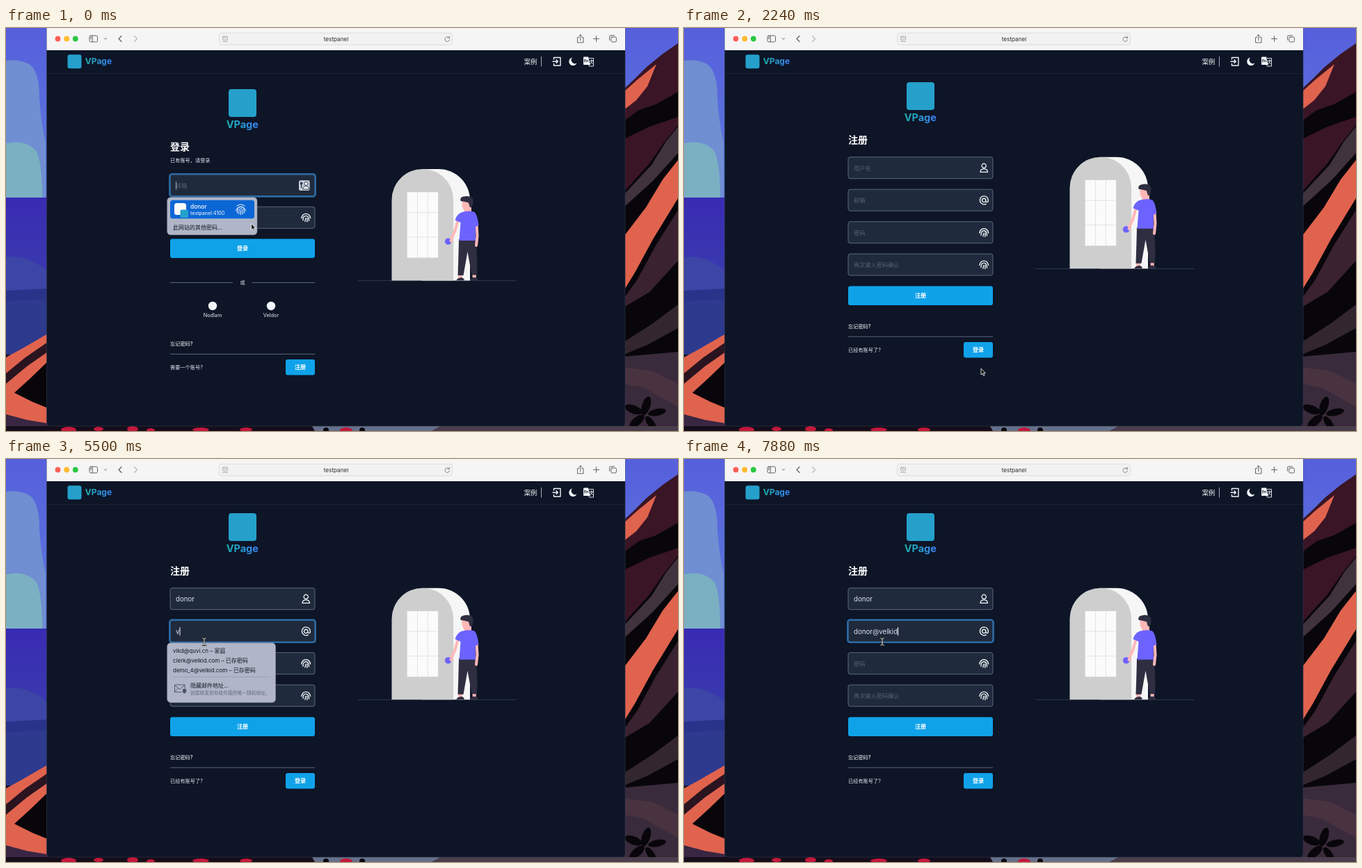
An HTML page for the animation above (8000 ms loop, 966 by 580 pixels).

```html
<!DOCTYPE html>
<html lang="zh-CN">
<head>
<meta charset="utf-8">
<title>Sign in and register</title>
<style>
html, body { margin: 0; width: 100%; height: 100%; overflow: hidden; background: #0d1527; }
svg { display: block; width: 100vw; height: 100vh; font-family: Inter, 'Noto Sans CJK SC', 'Noto Sans CJK', sans-serif; }
text { white-space: pre; }
.line { fill: none; stroke-linecap: round; stroke-linejoin: round; }
.mid { text-anchor: middle; }
.bold { font-weight: 700; }
.med { font-weight: 500; }
.brand { font-weight: 700; fill: url(#brand); }
</style>
</head>
<body>
<svg id="stage" viewBox="0 0 966 580" preserveAspectRatio="none">
  <defs>
    <linearGradient id="brand"><stop stop-color="#1bb0ae"/><stop offset="1" stop-color="#3b82f6"/></linearGradient>
    <linearGradient id="sky" x2="0" y2="1"><stop stop-color="#565fdc"/><stop offset="1" stop-color="#5c7cdc"/></linearGradient>
    <linearGradient id="sea" x2="0" y2="1"><stop stop-color="#392bb2"/><stop offset="1" stop-color="#3a3fae"/></linearGradient>
  </defs>

  <g id="wallpaper">
    <path fill="url(#sky)" d="M0 0H966V250H0Z"/>
    <path fill="#6f8fd2" d="M0 47Q22 44 36 54Q48 66 48 100Q50 135 57 165V244H0Z"/>
    <path fill="#7bb0c3" d="M0 166Q30 160 44 178Q52 195 52 244H0Z"/>
    <path fill="url(#sea)" d="M0 244H60V400H0Z"/>
    <path fill="#3d45a6" d="M0 330Q30 325 60 350V385H0Z"/>
    <path fill="#2a338a" d="M0 378L60 375V400H0Z"/>
    <path fill="#2d3a8d" d="M0 393L60 390V470H0Z"/>
    <path fill="#e0634e" d="M0 474L22 462L60 440V580H0Z"/>
    <path fill="#2a1420" d="M0 497L28 474L60 452V466L30 487L0 512Z"/>
    <path fill="#08060b" d="M60 480L34 505L12 525L38 538L60 547Z"/>
    <path fill="#382642" d="M0 556L30 564L60 569V580H0Z"/>

    <path fill="#391525" d="M966 22L943 38L921 56L905 72L888 88V240H966Z"/>
    <path fill="#e0634e" d="M935 52L908 74L888 92V118L906 104L922 84Z"/>
    <path fill="#08060b" d="M966 92L934 110L910 118L888 134V160L925 142L966 128Z"/>
    <path fill="#08060b" d="M966 140L945 166L925 195L888 236V580H966Z"/>
    <path fill="#40333e" d="M966 142L949 163L928 197L888 240V258L930 220L966 180Z"/>
    <path fill="#e0634e" d="M966 190L944 218L920 258L888 300V378L904 352L930 304L966 245Z"/>
    <path fill="#3a2230" d="M966 262L934 313L907 363L888 389V402L925 380L966 335Z"/>
    <path fill="#33262f" d="M888 452L930 425L966 398V432L922 456L888 470Z"/>
    <path fill="#3a2b3c" d="M888 473L966 466V580H888Z"/>
    <path fill="#4a3340" d="M888 488L930 494L966 512V545L916 517L888 512Z"/>
    <g fill="#08060b">
      <ellipse cx="920" cy="544" rx="6" ry="14" transform="rotate(18 920 544)"/>
      <ellipse cx="902" cy="549" rx="13" ry="6" transform="rotate(20 902 549)"/>
      <ellipse cx="936" cy="553" rx="13" ry="5" transform="rotate(-12 936 553)"/>
      <ellipse cx="907" cy="566" rx="13" ry="6" transform="rotate(-40 907 566)"/>
      <ellipse cx="927" cy="569" rx="12" ry="5" transform="rotate(55 927 569)"/>
    </g>
    <path fill="#150d1a" d="M0 573H966V580H0Z"/>
    <path fill="#66708a" d="M440 573H625L612 580H444Z"/>
    <path fill="#4b3e4c" d="M625 573H966V580H612Z"/>
    <g fill="#c4183c">
      <ellipse cx="90" cy="578" rx="11" ry="4"/><ellipse cx="133" cy="577" rx="7" ry="3"/>
      <ellipse cx="182" cy="577" rx="8" ry="4"/><ellipse cx="208" cy="579" rx="6" ry="3"/>
      <ellipse cx="280" cy="578" rx="12" ry="3"/><ellipse cx="345" cy="578" rx="9" ry="3"/>
      <ellipse cx="489" cy="579" rx="9" ry="4"/>
    </g>
    <circle cx="460" cy="579" r="4" fill="#08060b"/><circle cx="512" cy="579" r="4" fill="#08060b"/>
  </g>

  <path fill="#0d1527" stroke="#30384a" stroke-width=".6" d="M58.5 0H890V567Q890 573 884 573H64.5Q58.5 573 58.5 567Z"/>
  <path fill="#f6f5f6" d="M58.5 0H890V32H58.5Z"/>

  <g id="toolbar">
    <circle cx="74.5" cy="15.5" r="3.9" fill="#fe5f57"/>
    <circle cx="87.2" cy="15.5" r="3.9" fill="#febc2e"/>
    <circle cx="99.8" cy="15.5" r="3.9" fill="#28c840"/>
    <rect x="306.5" y="7.2" width="335" height="17" rx="3.5" fill="#f3f2f3" stroke="#d9d8d9" stroke-width=".8"/>
    <g class="line" stroke="#636365" stroke-width="1">
      <rect x="120" y="11" width="11.5" height="9" rx="1.8"/><path d="M124.2 11V20M121.5 13.3H122.7M121.5 15H122.7"/>
      <path d="M141.5 14.8L143 16.3L144.5 14.8"/>
      <path stroke-width="1.3" d="M166 11.5L162 15.5L166 19.5"/>
      <path stroke="#b9b9bb" stroke-width="1.3" d="M184.5 11.5L188.5 15.5L184.5 19.5"/>
      <g stroke="#9a9a9c" stroke-width=".8"><rect x="311.5" y="12" width="7" height="5" rx="1"/><path d="M311.5 19.3H318.5M313 14H317"/></g>
      <path stroke="#78787a" stroke-width=".9" d="M637 14.2A3.3 3.3 0 1 0 637.6 16.8M635 14.2H637.4V11.9"/>
      <path d="M823.5 13.5H821.5V21H830V13.5H828M825.8 18V9.8M823.6 11.8L825.8 9.6L828 11.8"/>
      <path d="M844.5 15.5H852.5M848.5 11.5V19.5"/>
      <rect x="869.8" y="13" width="7.6" height="7" rx="1.4"/><path d="M867.6 17.4V12.2Q867.6 10.8 869 10.8H874.6"/>
    </g>
    <text x="474.5" y="19" font-size="8.2" class="mid" fill="#2b2b2d">testpanel</text>
  </g>

  <g id="nav">
    <path stroke="#1b2536" d="M58.5 65.5H890"/>
    <rect x="88.5" y="38.2" width="20" height="20" rx="3" fill="#25a0cb"/>
    <text x="113.8" y="52.4" font-size="12" class="brand">VPage</text>
    <text x="744.8" y="52" font-size="9.3" class="med" fill="#fff">案例</text>
    <path stroke="#cbd5e1" stroke-width=".8" d="M769.5 41V55.5"/>
    <g class="line" stroke="#f1f5f9" stroke-width="1.4">
      <path d="M787.5 45V42.5H797V54H787.5V51.5M786 48.2H793M791 45.8L793.4 48.2L791 50.6"/>
    </g>
    <path fill="#f1f5f9" d="M814 42.6A5.8 5.8 0 1 0 820.4 50.6A5.2 5.2 0 0 1 814 42.6Z"/>
    <path fill="#f1f5f9" d="M831 41.5H837L840 53H831Q830 53 830 52V42.5Q830 41.5 831 41.5Z"/>
    <path class="line" stroke="#f1f5f9" stroke-width=".9" d="M838 43.5H844.5V55H838.5L837.5 53M839.5 47H843.5M841.5 45.8V47M843 47Q842 50.5 839.8 51.5M840.5 48.5L843.3 51.5"/>
    <text x="831" y="48.8" font-size="5" class="bold" fill="#0d1527">En</text>
  </g>

  <g id="scene">
    <path stroke="#3b4353" stroke-width=".8" d="M505 363.7H734"/>
    <path fill="#f6f6f6" d="M598 203H622A45 45 0 0 1 667 248V363.5H598Z"/>
    <path fill="#cecece" d="M554.5 363.5V247.3A44.3 44.3 0 0 1 643.1 247.3V363.5Z"/>
    <rect x="576.7" y="236.2" width="44.5" height="94.4" fill="#fbfbfb"/>
    <path stroke="#dedede" stroke-width=".8" d="M591.5 236V330.6M606.3 236V330.6M576.7 265.5H621.2M576.7 301H621.2"/>
    <path fill="#ffb8b8" d="M650 353H656.5L655.5 361H650ZM670 353H676L675.5 361H671ZM657 256H669V267H659Z"/>
    <path fill="#ffb8b8" d="M655.5 248H669V257Q667 262 661 262Q655.5 261 655.5 255Z"/>
    <path fill="#2f2e41" d="M653.5 249Q652 243.5 658 242.5Q666 240.5 670.5 245Q673 250 670 257Q668 259.5 666.5 257L665 251.5Q659 249.5 653.5 249Z"/>
    <path fill="#2f2e41" d="M651 304H675Q678.5 329 677 355.5H669.5L663.5 322L657.5 356H649.5Q650.5 327 651 304Z"/>
    <path fill="#2f2e41" d="M647.5 363.3Q648 360 655 359L658.5 361V363.3ZM667 363.3Q667 360 673 358.8L678 360.5V363.3Z"/>
    <path class="line" stroke="#ffb8b8" stroke-width="4" d="M649.5 277L645.5 292L640 304M676.5 283L677.5 299L676 313"/>
    <path fill="#6c63ff" d="M658 264.5Q666 262.5 672.5 264.5Q677 266 679.5 284L674.8 286L675 306H651.5L653.5 280L645.5 276.5Q649 265.5 658 264.5Z"/>
    <circle cx="635.6" cy="307.2" r="4.7" fill="#6c63ff"/>
    <circle cx="640" cy="306" r="2.4" fill="#ffb8b8"/>
  </g>

  <g id="pages"></g>
  <g id="popups"></g>
  <g id="pointer"></g>
</svg>
<script>
const $ = id => document.getElementById(id);
const BLUE = '#10a2e9', HOVER = '#0769a3', PALE = '#e2e8f0';

const label = (x, y, size, str, cls = '', fill = PALE) =>
  `<text x="${x}" y="${y}" font-size="${size}" class="${cls}" fill="${fill}">${str}</text>`;
const rule = (x1, x2, y, color = '#667287') =>
  `<path stroke="${color}" stroke-width=".9" d="M${x1} ${y}H${x2}"/>`;
const place = (x, y, body) => `<g transform="translate(${x} ${y})">${body}</g>`;
const stroke = (d, w = 1.4, color = '#f1f5f9') =>
  `<path class="line" stroke="${color}" stroke-width="${w}" d="${d}"/>`;

const icons = {
  user: stroke('M0-6.2a3 3 0 1 1 0 6.2a3 3 0 1 1 0-6.2M-5.2 6Q-5.2 1.4 0 1.4Q5.2 1.4 5.2 6Z', 1.3),
  mail: stroke('M2.7 0a2.7 2.7 0 1 1-5.4 0a2.7 2.7 0 1 1 5.4 0V1a1.7 1.7 0 0 0 3.4 0V0A6 6 0 1 0 3 5.2', 1.4),
  finger: stroke('M-6.4 .6Q-5.2-5.6 0-5.6Q5.2-5.6 6.4 .6M-4.2 3.8Q-4.6-2.6 0-2.6Q4.2-2.6 4.4 4.4M-1.4 5.4Q-.4 3.4-.6 .8M1.6 5.8Q2.2 2.6 1.6 .6', 1.4),
  card: `<rect x="-8" y="-7.3" width="15.6" height="14.6" rx="2.5" fill="#c9cfda"/>
    <circle cx="2.4" cy="-2.6" r="2.6" fill="#f8fafc" stroke="#273449"/>
    <path fill="#f8fafc" stroke="#273449" d="M-2.6 5.4Q-1.8 1.2 2.4 1.2Q6.2 1.2 6.6 5.4Z"/>
    <path fill="#273449" d="M-4.4-5a2 2 0 0 1 .7 3.8V3.6H-5.1V-1.2A2 2 0 0 1-4.4-5Z"/>`
};

const button = (x, y, w, h, str, id = '') =>
  `<rect id="${id}" x="${x}" y="${y}" width="${w}" height="${h}" rx="3" fill="${BLUE}"/>` +
  label(x + w / 2, y + h / 2 + 3, 8.1, str, 'mid bold', '#fff');

const field = (id, y, hint, icon) => `
  <rect x="236" y="${y}" width="208" height="31" rx="3" fill="#1f2a3c" stroke="#667287" stroke-width=".9"/>
  <rect id="${id}Ring" x="235.3" y="${y - .7}" width="209.4" height="32.4" rx="3.6" fill="none" stroke="#2a6ba6" stroke-width="2.4"/>
  <g id="${id}Hint">${label(244, y + 19, 8.2, hint, '', '#566276')}</g>
  <text id="${id}Text" x="244" y="${y + 19.3}" font-size="9.7" fill="#dbe2ec"></text>
  <rect id="${id}Caret" x="244" y="${y + 10}" width="1" height="12" fill="#fff"/>
  <g id="${id}Icon">${place(431.2, y + 15.7, icons[icon])}</g>`;

const head = (y, title) => `
  <rect x="320" y="${y}" width="40" height="40" rx="4" fill="#25a0cb"/>
  <text x="339.8" y="${y + 55.5}" font-size="14.5" class="mid brand">VPage</text>` +
  label(236, y + 88.3, 14, title, 'bold', '#fff');

const foot = (y, ask, action, id) =>
  label(236, y - 12.6, 7.2, '忘记密码?', 'med', '#fff') + rule(236, 444, y) +
  label(236, y + 21.6, 7.2, ask) + button(402, y + 7.7, 42, 22.5, action, id);

const social = (x, name) =>
  `<circle cx="${x}" cy="400" r="6.2" fill="#f1f5f9"/>` + label(x, 416.4, 7.3, name, 'mid');

$('pages').innerHTML = `
  <g id="login">${head(88, '登录')}${label(236, 193.2, 7.2, '已有账号，请登录')}
    ${field('acct', 210.8, '邮箱', 'user')}
    <g id="key">${place(429, 226.6, icons.card)}</g>
    <g id="need">${label(236, 250.8, 7.2, '必需', '', '#c0176a')}</g>
    ${field('pass', 257.3, '密码', 'finger')}
    ${button(236, 303.6, 208, 27.4, '登录')}
    ${rule(236, 326, 366.4)}${rule(354, 444, 366.4)}${label(340, 369, 7.2, '或', 'mid')}
    ${social(297, 'Nodlam')}${social(381, 'Veldor')}
    ${foot(469.3, '需要一个账号?', '注册', 'join')}
  </g>
  <g id="register">${head(78, '注册')}
    ${field('name', 185.7, '用户名', 'user')}${field('email', 232.2, '邮箱', 'mail')}
    ${field('new', 278.7, '密码', 'finger')}${field('again', 325, '再次输入密码确认', 'finger')}
    ${button(236, 371.5, 208, 27.4, '注册')}
    ${foot(444.2, '已经有账号了?', '登录', 'back')}
  </g>`;

const panel = (id, y, w, h, body) =>
  `<g id="${id}"><rect x="231.7" y="${y}" width="${w}" height="${h}" rx="5" fill="#b0b6c8" stroke="#8b92a4" stroke-width=".5"/>${body}</g>`;
const INK = '#161a26', SOFT = '#666c7f';
const first = label(240, 279, 8, 'vlkd@quvi.cn – 家庭', '', INK);

$('popups').innerHTML =
  panel('saved', 243.7, 129.3, 54, `
    <g id="mark"><rect x="236" y="247.8" width="121" height="26.4" rx="3.5" fill="#0b67d5"/>
      ${place(337.5, 261, stroke('M-7 2A7.2 7.2 0 0 1 7 2M-5.6-4.8Q0-9.4 5.6-4.8M-5 5Q-5.4-3.8 0-3.8Q5.4-3.8 5 5M-2.6 6.8Q-3.2-1.2 0-1.2Q3.2-1.2 2.6 6.8M0 1.6V7.4', 1, '#fff'))}</g>
    <g id="sep">${rule(240, 353, 276.3, '#9aa0b2')}</g>
    <rect x="242" y="252" width="17" height="17" rx="3.5" fill="#f8fafa"/>
    <rect x="250.5" y="261.5" width="11.5" height="11.5" rx="2" fill="#25a0cb"/>
    <text id="who" x="265" y="259.8" font-size="8.3" class="med">donor</text>
    <text id="site" x="265" y="269" font-size="7.1">testpanel:4100</text>
    ${label(240, 290, 8, '此网站的其他密码…', '', INK)}`) +
  panel('mails', 264.7, 155.8, 85.8, first +
    label(240, 292.8, 8, 'clerk@velkid.com – 已存密码', '', INK) +
    label(240, 306.6, 8, 'demo_4@velkid.com – 已存密码', '', INK) +
    rule(240, 380, 313.7, '#9aa0b2') +
    stroke('M252 335.5H242.5V325H257V330M242.5 325.5L249.8 331.5L257 325.5M242.5 335L247.5 330', .9, '#4c5264') +
    `<path fill="#4c5264" d="M256.5 330.5L259.2 331.7V334.5Q259 336.6 256.5 337.5Q254 336.6 253.8 334.5V331.7Z"/>` +
    label(265, 329.2, 8, '隐藏邮件地址…', '', INK) +
    label(265, 339.3, 6.75, '创建转发到你收件箱的唯一随机地址。', '', SOFT)) +
  panel('match', 264.7, 93, 23, first);

const beam = 'M-2.4-5.2Q0-5 0-3.4Q0-5 2.4-5.2M0-3.4V3.4M-2.4 5.2Q0 5 0 3.4Q0 5 2.4 5.2M-1.2 1H1.2';
$('pointer').innerHTML = `
  <path id="arrow" fill="#111" stroke="#fff" stroke-width=".8" stroke-linejoin="round" d="M0 0V9L2.1 7.2L3.6 10.6L5.1 9.9L3.6 6.6H6.3Z"/>
  <path id="hand" fill="#fff" stroke="#111" stroke-width=".8" stroke-linejoin="round" d="M-1.2 .2Q-.2-1 .8 .2V3.4L4 4.2Q5.2 4.6 4.8 6.6L3.8 9.6H-.8L-3.4 6.2Q-3.2 4.8-1.2 6Z"/>
  <g id="beam">${stroke(beam, 2, '#111')}${stroke(beam, .9, '#eee')}</g>`;

// Each track holds [start time, value…] until its next entry.
const mouse = [
  [0, 'arrow', 352.5, 281.5], [150, 'arrow', 353, 283], [300, 'arrow', 353, 285], [440, 'arrow', 353, 286],
  [890, 'arrow', 385, 365], [1040, 'arrow', 448.3, 529], [1340, 'arrow', 447, 523], [1490, 'arrow', 438, 507],
  [1640, 'hand', 429, 494], [1790, 'hand', 427, 491],
  [2240, 'arrow', 427, 490], [2530, 'arrow', 420, 470], [2680, 'arrow', 378, 370], [2830, 'arrow', 322, 255],
  [2970, 'beam', 296, 211], [3120, 'beam', 293, 203],
  [4160, 'beam', 292.5, 212], [4310, 'beam', 289, 234], [4450, 'beam', 286, 254], [4600, 'beam', 285, 263]
];
const blink = [[0, .6], [150, .25], [300, 0], [440, .5], [590, 1], [1190, .4], [1340, 0], [1640, .7], [1790, 1]];
const user = 'donor', domain = 'velkid';
const typing = (text, times, counts) => times.map((t, i) => [t, text.slice(0, counts[i])]);
const nameTrack = [[0, ''], ...typing(user, [3570, 3720, 3860, 4010], [1, 2, 4, 5])];
const mailTrack = [
  [0, ''], [5200, 'v'], [5650, 'vl'], [5950, ''],
  ...typing(user, [6100, 6240, 6390, 6540], [1, 2, 4, 5]),
  ...typing(`${user}@${domain}`, [6990, 7290, 7440, 7590, 7740, 7880], [6, 7, 8, 9, 10, 12])
];

const at = (track, t) => track.findLast(step => step[0] <= t);
const show = (id, on) => $(id).style.display = on ? '' : 'none';

function setField(id, text, focus, caret = 1) {
  const node = $(id + 'Text');
  if (node.textContent !== text) node.textContent = text;
  show(id + 'Hint', !text);
  show(id + 'Ring', focus);
  show(id + 'Caret', focus);
  if (!focus) return;
  $(id + 'Caret').setAttribute('x', 244 + (text ? node.getComputedTextLength() : 0));
  $(id + 'Caret').setAttribute('opacity', caret);
}

function draw(t) {
  const isLogin = t < 2240, open = t < 2090, marked = t < 890;
  show('login', isLogin);
  show('register', !isLogin);
  $('scene').setAttribute('transform', `translate(0 ${isLogin ? 0 : -17.3})`);

  show('saved', open);
  show('mark', marked);
  show('sep', !marked);
  $('who').setAttribute('fill', marked ? '#fff' : INK);
  $('site').setAttribute('fill', marked ? '#fff' : SOFT);
  show('key', open);
  show('acctIcon', !open);
  show('need', !open);
  $('join').setAttribute('fill', t >= 1640 ? HOVER : BLUE);

  show('mails', t >= 4750 && t < 5650);
  show('match', t >= 5650 && t < 5950);

  if (isLogin) {
    setField('acct', '', open, at(blink, t)[1]);
    setField('pass', '', false);
  } else {
    setField('name', at(nameTrack, t)[1], t >= 3120 && t < 4750);
    setField('email', at(mailTrack, t)[1], t >= 4750);
    setField('new', '', false);
    setField('again', '', false);
  }

  const [, kind, x, y] = at(mouse, t);
  for (const id of ['arrow', 'hand', 'beam']) show(id, id === kind);
  $('pointer').setAttribute('transform', `translate(${x} ${y})`);
}

const start = performance.now();
function loop() {
  draw((performance.now() - start) % 8000);
  requestAnimationFrame(loop);
}
loop();
</script>
</body>
</html>
```
